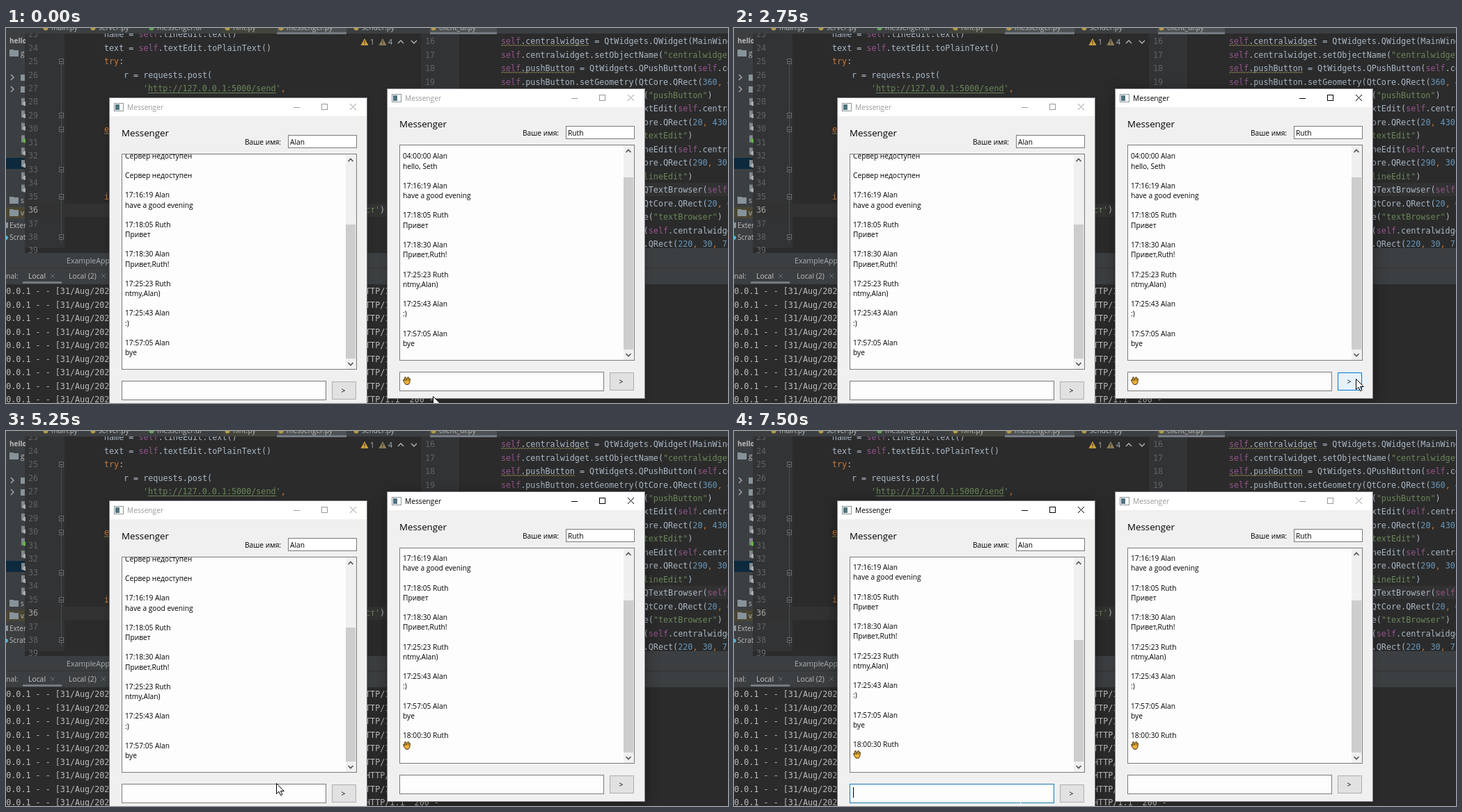
Recreate the animation shown at these times as an HTML page with a canvas. Size 1037x540 px, loop 8000 ms.

```html
<!DOCTYPE html>
<html lang="ru">
<head>
<meta charset="utf-8">
<title>Messenger</title>
<style>
html, body { margin: 0; width: 100%; height: 100%; overflow: hidden; background: #2b2b2b; }
canvas { display: block; }
</style>
</head>
<body>
<canvas id="stage" width="1037" height="540"></canvas>
<script>
const ctx = document.getElementById('stage').getContext('2d');
const LOOP = 8000;
const UI = '"Open Sans", "Noto Sans", sans-serif';
const MONO = '11.73px "DejaVu Sans Mono", "Noto Sans Mono", monospace';
const CHAR = 7.06, ROW = 19.45;

const rect = (x, y, w, h, fill) => { ctx.fillStyle = fill; ctx.fillRect(x, y, w, h); };
const box = (x, y, w, h, fill, stroke) => {
  rect(x, y, w, h, stroke);
  rect(x + 1, y + 1, w - 2, h - 2, fill);
};
const dot = (x, y, r, fill) => {
  ctx.fillStyle = fill;
  ctx.beginPath();
  ctx.arc(x, y, r, 0, 7);
  ctx.fill();
};
function line(points, color, width = 1) {
  ctx.strokeStyle = color;
  ctx.lineWidth = width;
  ctx.beginPath();
  points.forEach(([x, y]) => ctx.lineTo(x, y));
  ctx.stroke();
}
function polygon(points, fill, stroke) {
  ctx.beginPath();
  points.forEach(([x, y]) => ctx.lineTo(x, y));
  ctx.closePath();
  ctx.fillStyle = fill;
  ctx.fill();
  if (!stroke) return;
  ctx.strokeStyle = stroke;
  ctx.lineWidth = 1;
  ctx.stroke();
}
// y is the middle of the capitals
function label(str, x, y, color, size = 10.2, style = '') {
  ctx.font = `${style} ${size}px ${UI}`;
  ctx.fillStyle = color;
  ctx.fillText(str, x, Math.round(y + size * 0.36));
}
function mono(str, x, y, color) {
  ctx.font = MONO;
  ctx.fillStyle = color;
  ctx.fillText(str, x, Math.round(y + 4.2));
}
function wave(x, y, w, color) {
  const pts = [];
  for (let i = 0; i <= w; i += 2) pts.push([x + i, y + (i % 4 ? 1 : -1)]);
  line(pts, color, 0.9);
}
function clipped(x, y, w, h, draw) {
  ctx.save();
  ctx.beginPath();
  ctx.rect(x, y, w, h);
  ctx.clip();
  draw();
  ctx.restore();
}

const TOKENS = /('[^']*'?|"[^"]*"?)|(\bself\b)|(\b\d+\b)|(\b(?:try|except|if)\b|,)|[^'"\d,\w]+|\w+/g;
const TOKEN_COLORS = ['#6a8759', '#94558d', '#6897bb', '#cc7832'];
function code(str, x, y) {
  for (const m of str.matchAll(TOKENS)) {
    const kind = m.slice(1, 5).findIndex(Boolean);
    mono(m[0], x + m.index * CHAR, y, TOKEN_COLORS[kind] || '#a9b7c6');
  }
}

function widgetCode(name, type, geometry) {
  return [
    `self.${name} = QtWidgets.${type}(self.centralwidget)`,
    `self.${name}.setGeometry(QtCore.QRect(${geometry}))`,
    `self.${name}.setObjectName("${name}")`
  ];
}
const RIGHT_CODE = [
  'self.centralwidget = QtWidgets.QWidget(MainWindow)',
  'self.centralwidget.setObjectName("centralwidget")',
  ...widgetCode('pushButton', 'QPushButton', '360, 430, 41, 31'),
  ...widgetCode('textEdit', 'QTextEdit', '20, 430, 331, 31'),
  ...widgetCode('lineEdit', 'QLineEdit', '290, 30, 111, 21'),
  ...widgetCode('textBrowser', 'QTextBrowser', '20, 60, 381, 351'),
  ...widgetCode('label', 'QLabel', '220, 30, 71, 21').slice(0, 2)
];

function leftEditor() {
  rect(27, 0, 569, 324, '#2b2b2b');
  rect(27, 0, 57, 324, '#313335');
  rect(27, 253, 569, 19, '#323232');
  for (let n = 23; n < 40; n++)
    mono(n, 32, 9 + (n - 23) * ROW, n === 36 ? '#a4a3a3' : '#606366');
  line([[79.5, 48], [79.5, 310]], '#4a4d4f');
  for (const y of [48, 126, 146, 204, 243, 301]) {
    box(76, y - 4, 7, 8, '#313335', '#66696c');
    rect(78, y, 3, 1, '#8a8d90');
  }
  code('name = self.lineEdit.text()', 141, 9);
  code('text = self.textEdit.toPlainText()', 141, 28.4);
  code('try:', 141, 48);
  code('r = requests.post(', 169, 67.4);
  code("'http://127.0.0.1:5000/send',", 197, 87);
  rect(204, 93, 184, 1, '#6a8759');
  code('except:', 141, 146);
  wave(141, 152, 8, '#8f8556');
  code('if', 141, 243);
  mono("ст'", 516, 262, '#6a8759');
  mono(')', 537, 262, '#a9b7c6');

  const warn = (x, n, color) => {
    polygon([[x, 15], [x + 5.5, 25], [x - 5.5, 25]], color);
    rect(x - 0.5, 18, 1, 4, '#2b2b2b');
    rect(x - 0.5, 23, 1, 1, '#2b2b2b');
    label(n, x + 8, 20.5, '#a9b7c6', 10.5);
  };
  warn(515, '1', '#d0a03a');
  warn(541, '4', '#8f7f55');
  line([[563, 22], [567, 18], [571, 22]], '#b4b8ba', 1.3);
  line([[582, 18], [586, 22], [590, 18]], '#b4b8ba', 1.3);
}

function rightEditor() {
  rect(596, 0, 441, 318, '#2b2b2b');
  rect(596, 0, 54, 318, '#313335');
  rect(650, 223, 387, 19, '#323232');
  rect(649, 0, 1, 318, '#3c3f41');
  RIGHT_CODE.forEach((str, i) => {
    const y = 19 + i * ROW;
    mono(16 + i, 602, y, '#606366');
    code(str, 711, y);
  });
  wave(711, 25, 127, '#8f8556');
  wave(711, 64, 106, '#8f8556');
}

function tabs() {
  rect(0, 0, 1037, 8, '#3c3f41');
  rect(310, 0, 78, 8, '#43453c');
  for (const [x, w] of [[389, 100], [609, 96]]) {
    rect(x, 0, w, 9, '#4e5254');
    rect(x, 6, w, 3, '#747a80');
  }
  const names = ['main.py', 'server.py', 'messenger.ui', 'hint.py', 'messenger.py', 'sender.py', 'client_ui.py'];
  [65, 133, 217, 326, 403, 511, 622].forEach((x, i) => {
    dot(x - 8, 0, 3.5, i === 2 ? '#62a35a' : '#b59b45');
    label(names[i], x, -1, '#bbbbbb', 10.2);
  });
}

function project() {
  const folder = y => {
    rect(5, y - 5, 6, 3, '#87939a');
    rect(5, y - 4, 13, 9, '#87939a');
  };
  rect(0, 8, 27, 316, '#3c3f41');
  rect(0, 187, 27, 16, '#0d293e');
  rect(0, 258, 27, 16, '#4b4632');
  clipped(0, 8, 28, 316, () => {
    label('hello', 5, 18, '#bbbbbb', 10, 'bold');
    [[36, 'g'], [248, 's'], [266, 'v']].forEach(([y, s]) => { folder(y); label(s, 21, y, '#bbbbbb', 10); });
    for (const y of [71, 88]) {
      line([[7, y - 4], [11, y], [7, y + 4]], '#adb0b2', 1.3);
      rect(21, y - 4, 6, 9, '#87939a');
    }
    for (let y = 106; y < 235; y += 17.8) {
      rect(22, y - 5, 5, 10, '#7f878c');
      dot(27, y + 3, 3, y > 155 && y < 163 ? '#62b543' : '#a8adb0');
    }
    label('External Libraries', 5, 284, '#bbbbbb', 10);
    label('Scratches', 5, 301, '#bbbbbb', 10);
    rect(0, 280, 3, 8, '#87939a');
    dot(0, 302, 3, '#40b6e0');
  });
}

// Log rows come in at the bottom; some requests are one character longer
const LOG = [[3000, 1], [3500, 0], [4500, 1], [5500, 1], [6500, 1], [7500, 1]];
function logRows(t) {
  const added = LOG.filter(([at]) => t >= at).map(([, extra]) => extra);
  return [...Array(9).fill(0), ...added].slice(-9);
}

function bottomPanel(t) {
  rect(0, 317, 1037, 52, '#3c3f41');
  rect(27, 317, 569, 7, '#2b2b2b');
  mono('39', 32, 320, '#606366');
  rect(0, 345, 1037, 1, '#323232');
  label('ExampleApp', 87, 335, '#a9b0b5', 10.6);
  label('nal:', 0, 357, '#bbbbbb', 10.4);
  rect(24, 365, 56, 3, '#747a80');
  label('Local', 32, 357, '#c8c8c8', 10.4);
  label('Local (2)', 90, 357, '#bbbbbb', 10.4);
  for (const x of [67, 140]) {
    line([[x - 3, 354], [x + 3, 360]], '#6d7072');
    line([[x - 3, 360], [x + 3, 354]], '#6d7072');
  }
  rect(0, 369, 1037, 171, '#2b2b2b');
  logRows(t).forEach((extra, i) => {
    const y = 379 + i * 19.5;
    mono('127.0.0.1 - - [31/Aug/2021', -28, y, '#bbbbbb');
    mono('HTTP/1.1" 200 -', 509 + extra * CHAR, y, '#bbbbbb');
  });
}

const HAND = '\u0000';
const LOST = ['Сервер недоступен', '', 'Сервер недоступен', ''];
const CHAT = [
  ['04:00:00 Alan', 'hello, Seth'],
  ['17:16:19 Alan', 'have a good evening'],
  ['17:18:05 Ruth', 'Привет'],
  ['17:18:30 Alan', 'Привет,Ruth!'],
  ['17:25:23 Ruth', 'ntmy,Alan)'],
  ['17:25:43 Alan', ':)'],
  ['17:57:05 Alan', 'bye'],
  ['18:00:30 Ruth', HAND]
];
const chatLines = (from, to) => CHAT.slice(from, to).flatMap(([head, body]) => [head, body, '']);

function hand(x, y) {
  ctx.save();
  ctx.translate(x, y - 6);
  ctx.lineJoin = 'round';
  polygon([
    [0.8, 4], [2.8, 6], [2.2, 1.4], [4, 0.6], [5.6, 5], [7, 0.6], [8.6, 1.2], [8.6, 3.6],
    [10.4, 3], [10, 8], [8, 11.4], [4.2, 11.4], [1.2, 7.4]
  ], '#efb233', '#4a3610');
  line([[4.4, 3], [4.8, 6.5]], '#4a3610', 0.7);
  line([[8.4, 3.6], [7.6, 6.5]], '#4a3610', 0.7);
  ctx.restore();
}

function messenger(dx, dy, s) {
  ctx.save();
  ctx.translate(dx, dy);
  ctx.save();
  ctx.shadowColor = s.active ? 'rgba(0,0,0,.4)' : 'rgba(0,0,0,.2)';
  ctx.shadowBlur = s.active ? 18 : 9;
  ctx.shadowOffsetY = 3;
  rect(148, 100, 371, 447, '#85818a');
  ctx.restore();
  rect(149, 101, 369, 445, '#f0f0f0');
  rect(149, 101, 369, 26, '#ffffff');

  const ink = s.active ? '#000000' : '#999999';
  box(155, 108, 14, 12, '#fff', '#8a9499');
  rect(157, 110, 6, 8, '#4f7580');
  label('Messenger', 174, 114, ink, 10.2);
  line([[413, 114.5], [422, 114.5]], ink);
  ctx.strokeRect(453.5, 109.5, 8, 8);
  line([[494, 109], [503, 118]], ink);
  line([[494, 118], [503, 109]], ink);

  label('Messenger', 166, 151, '#000', 13.3);
  label('Ваше имя:', 343, 164, '#000');
  box(405, 154, 99, 19, '#fff', '#7a7a7a');
  label(s.name, 408, 164, '#000');

  box(166, 181, 338, 311, '#fdfdfd', '#7a7a7a');
  clipped(167, 182, 321, 309, () => {
    s.lines.forEach((str, i) => {
      const y = s.top + i * 14.17;
      if (str === HAND) hand(171, y);
      else label(str, 171, y, '#000');
    });
  });
  rect(488, 182, 15, 309, '#f0f0f0');
  rect(488, s.thumb, 14, 476 - s.thumb, '#cdcdcd');
  line([[491.5, 192], [495, 188.5], [498.5, 192]], '#505050', 1.6);
  line([[491.5, 482], [495, 485.5], [498.5, 482]], '#505050', 1.6);

  box(166, 508, 294, 28, '#fdfdfd', s.focus ? '#1478b4' : '#7a7a7a');
  if (s.draft) hand(171, 521);
  if (s.caret) rect(s.draft ? 183 : 171, s.draft ? 511 : 513, 1, 15, '#000');
  box(468, 509, 35, 26, s.hover ? '#e5f1fb' : '#e1e1e1', s.hover ? '#0078d7' : '#adadad');
  label('>', 481.5, 522, '#000');
  ctx.restore();
}

const BEAM = true;
// time, x, y, text cursor
const POINTER = [
  [0, 613, 530], [250, 643, 521, BEAM], [1250, 821, 516], [1500, 882, 520],
  [1750, 893, 505], [3250, 781, 521, BEAM], [4500, 679, 516, BEAM], [4750, 419, 509],
  [5000, 395, 509], [5250, 388, 507], [5500, 388, 518], [6000, 390, 520],
  [6250, 395, 530], [6500, 395, 522], [6750, 400, 520], [7250, 411, 535, BEAM]
];
function pointer(t) {
  const [, x, y, beam] = POINTER.findLast(p => t >= p[0]);
  if (beam) return rect(x, y - 9, 1, 11, '#fff');
  ctx.save();
  ctx.translate(x + 0.5, y + 0.5);
  polygon([[0, 0], [0, 15], [3.6, 11.8], [6, 17.2], [8.4, 16.2], [6, 11], [10.8, 11]], '#fff', '#000');
  ctx.restore();
}

function draw(t) {
  const within = (a, b) => t >= a && t < b;
  leftEditor();
  rightEditor();
  project();
  tabs();
  bottomPanel(t);

  const gotLeft = t >= 7500, gotRight = t >= 3500;
  messenger(0, 0, {
    name: 'Alan', active: gotLeft, focus: gotLeft, caret: gotLeft,
    lines: gotLeft ? chatLines(1) : [...LOST, ...chatLines(1, 7)],
    top: gotLeft ? 196.5 : 184,
    thumb: gotLeft ? 301 : 283
  });
  messenger(399, -13, {
    name: 'Ruth', active: within(1000, 5750), focus: within(1000, 2750),
    caret: within(1000, 1500) || within(2000, 2500),
    draft: t < 3000, hover: within(1750, 3250),
    lines: gotRight ? chatLines(1) : chatLines(0, 7),
    top: gotRight ? 196.5 : 197.8,
    thumb: gotRight ? 257 : 228
  });
  pointer(t);
}

const start = performance.now();
function tick() {
  draw((performance.now() - start) % LOOP);
  requestAnimationFrame(tick);
}
tick();
</script>
</body>
</html>
```
